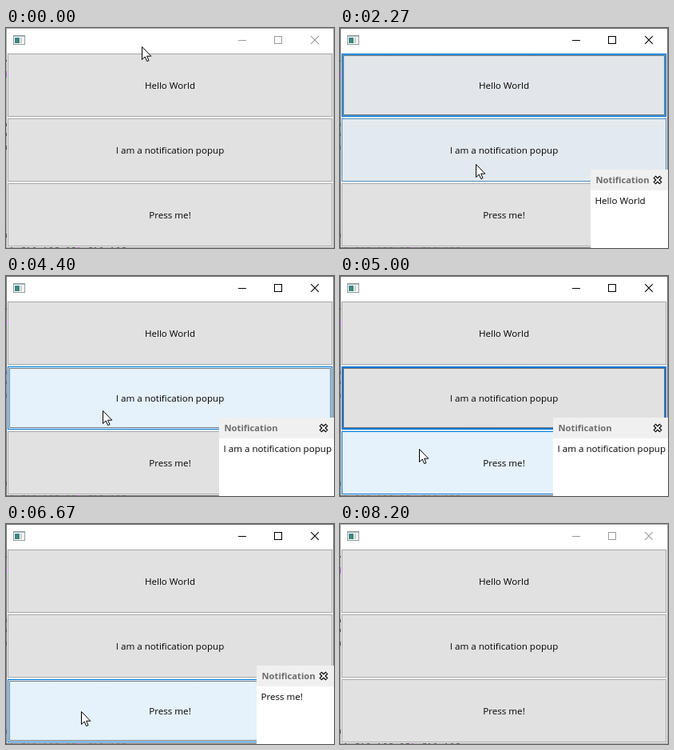
These frames come from a looping animation (411x275 px, 8390 ms). An HTML page with a canvas:

```html
<!DOCTYPE html>
<html lang="en">
<head>
<meta charset="utf-8">
<title>Notification popup</title>
<style>
html, body { margin: 0; width: 100%; height: 100%; overflow: hidden; background: #fff; }
canvas { display: block; width: 411px; height: 275px; }
</style>
</head>
<body>
<canvas id="stage" width="411" height="275"></canvas>
<script>
const W = 411, H = 275, LOOP = 8390, FPS = 15;
const ctx = document.getElementById('stage').getContext('2d');
const FONT = '"Open Sans", "Noto Sans", sans-serif';

const NORMAL = { fill: [225, 225, 225], edge: [173, 173, 173] };
const HOVER = { fill: [229, 241, 251], edge: [0, 120, 215] };
const PRESSED = { fill: [204, 228, 247], edge: [0, 84, 153] };

// Each pair is the start and end of a fade, in ms.
const buttons = [
  { label: 'Hello World', y: 32, over: [400, 560], out: [2200, 2300],
    down: [790, 925], up: [1430, 1530], focus: [790, 3260] },
  { label: 'I am a notification popup', y: 113, over: [2200, 2325], out: [4620, 4800],
    down: [3260, 3390], up: [3580, 3665], focus: [3260, 5250] },
  { label: 'Press me!', y: 194, over: [4640, 4800], out: [7020, 7300],
    down: [5250, 5380], up: [5700, 5800], focus: [5250, 8130] }
];

const popups = [
  { text: 'Hello World', x: 314, show: [1235, 1310], hide: [2930, 3130] },
  { text: 'I am a notification popup', x: 267, show: [3430, 3510], hide: [5250, 5470] },
  { text: 'Press me!', x: 314, show: [5570, 5650], hide: [7560, 7840] }
];

// Pointer path: time, x, y
const path = [
  [67, 170, 23], [733, 163, 81], [2000, 163, 81], [2266, 170, 170],
  [2400, 170, 170], [3130, 131, 150], [4333, 131, 150], [4399, 121, 168],
  [5200, 98, 219], [6600, 98, 219], [6666, 93, 234], [7466, 415, 186]
];

const ramp = (t, [a, b]) => Math.min(1, Math.max(0, (t - a) / (b - a)));
const pulse = (t, rise, fall) => ramp(t, rise) * (1 - ramp(t, fall));
const within = (t, [a, b]) => t >= a && t < b;
const mix = (a, b, k) => a.map((v, i) => v + (b[i] - v) * k);
const rgb = c => `rgb(${c.map(Math.round).join(',')})`;

function rect(color, x, y, w, h) {
  ctx.fillStyle = color;
  ctx.fillRect(x, y, w, h);
}

function frame(color, x, y, w, h) {
  ctx.strokeStyle = color;
  ctx.lineWidth = 1;
  ctx.strokeRect(x + 0.5, y + 0.5, w - 1, h - 1);
}

function text(str, x, y, color, font, align = 'left') {
  ctx.font = `${font} ${FONT}`;
  ctx.textAlign = align;
  ctx.fillStyle = color;
  ctx.fillText(str, x, y);
}

function cross(x, y, r, color, width) {
  ctx.strokeStyle = color;
  ctx.lineWidth = width;
  ctx.beginPath();
  ctx.moveTo(x - r, y - r);
  ctx.lineTo(x + r, y + r);
  ctx.moveTo(x + r, y - r);
  ctx.lineTo(x - r, y + r);
  ctx.stroke();
}

function drawIcon() {
  rect('#fff', 9, 9, 15, 12);
  frame('#8e9a9c', 9, 9, 15, 12);
  rect('#a9b4b6', 10, 10, 13, 1);
  const g = ctx.createLinearGradient(11, 12, 17, 19);
  g.addColorStop(0, '#3d7f95');
  g.addColorStop(1, '#3f8a68');
  rect(g, 11, 12, 6, 7);
  rect('#c3cacb', 18, 12, 2, 7);
  rect('#dfe4e4', 21, 12, 1, 7);
}

function drawWindow(active) {
  rect('#fff', 0, 0, W, H);
  rect('#f0f0f0', 1, 31, 409, 243);
  frame(active ? '#707070' : '#aaa', 0, 0, W, H);
  drawIcon();
  const ink = active ? '#000' : '#999';
  rect(ink, 291, 15, 10, 1);
  frame(ink, 336, 10, 10, 10);
  cross(387, 15, 4.8, ink, 1.1);
}

// Slivers of the text behind the window
function drawBackdrop() {
  for (const [y, h] of [[40, 2], [119, 4], [131, 4], [147, 5], [257, 5]]) {
    rect('#444', 0, y, 1, h);
  }
  rect('#a04bc0', 0, 54, 1, 8);
  for (let x = 6; x < 156; x += 7) {
    if (x % 4 !== 1) rect(x > 85 && x < 100 ? '#a04bc0' : '#555', x, 274, 2 + x % 3, 1);
  }
}

function drawButton(b, t) {
  const hover = pulse(t, b.over, b.out);
  const press = pulse(t, b.down, b.up);
  const focus = within(t, b.focus);
  const blend = key => mix(mix(NORMAL[key], HOVER[key], hover), PRESSED[key], press);
  const edge = focus ? mix(HOVER.edge, PRESSED.edge, press) : blend('edge');

  rect(rgb(blend('fill')), 2, b.y, 407, 79);
  frame(rgb(edge), 2, b.y, 407, 79);
  if (focus) {
    ctx.globalAlpha = (1 - hover) * (1 - press);
    frame(rgb(edge), 3, b.y + 1, 405, 77);
    ctx.globalAlpha = 1;
    ctx.setLineDash([1, 1]);
    frame('#000', 4, b.y + 2, 403, 75);
    ctx.setLineDash([]);
  }
  text(b.label, 205.5, b.y + 44, '#000', '11.6px', 'center');
}

function drawPopup(p, t) {
  const alpha = pulse(t, p.show, p.hide);
  if (!alpha) return;
  ctx.globalAlpha = alpha;
  rect('#f0f0f0', p.x, 177, W - p.x, 26);
  rect('#fff', p.x, 203, W - p.x, H - 203);
  text('Notification', p.x + 6.5, 194, '#6d6d6d', 'bold 11.2px');
  cross(398, 190, 4, '#000', 4.4);
  cross(398, 190, 3.4, '#fff', 1.8);
  text(p.text, p.x + 5.5, 220, '#000', '11.6px');
  ctx.globalAlpha = 1;
}

function pointerAt(t) {
  const i = path.findIndex(k => k[0] > t);
  if (i === 0) return path[0].slice(1);
  if (i < 0) return null;
  const [t0, ...from] = path[i - 1], [t1, ...to] = path[i];
  const u = (t - t0) / (t1 - t0);
  return mix(from, to, 1 - (1 - u) ** 2).map(Math.round);
}

const arrow = new Path2D('M.5 .5V16.5L4.2 13L6.7 18.6L9 17.6L6.6 12.2H11.8Z');

function drawPointer(t) {
  const pos = pointerAt(t);
  if (!pos) return;
  ctx.save();
  ctx.translate(...pos);
  ctx.fillStyle = '#fff';
  ctx.fill(arrow);
  ctx.strokeStyle = '#000';
  ctx.lineWidth = 1;
  ctx.stroke(arrow);
  ctx.restore();
}

function draw(t) {
  drawWindow(within(t, [790, 8130]));
  drawBackdrop();
  buttons.forEach(b => drawButton(b, t));
  popups.forEach(p => drawPopup(p, t));
  drawPointer(t);
}

const start = performance.now();

function tick() {
  const t = (performance.now() - start) % LOOP;
  draw(Math.floor((t + 5) * FPS / 1000) * 1000 / FPS);
  requestAnimationFrame(tick);
}
tick();
</script>
</body>
</html>
```
